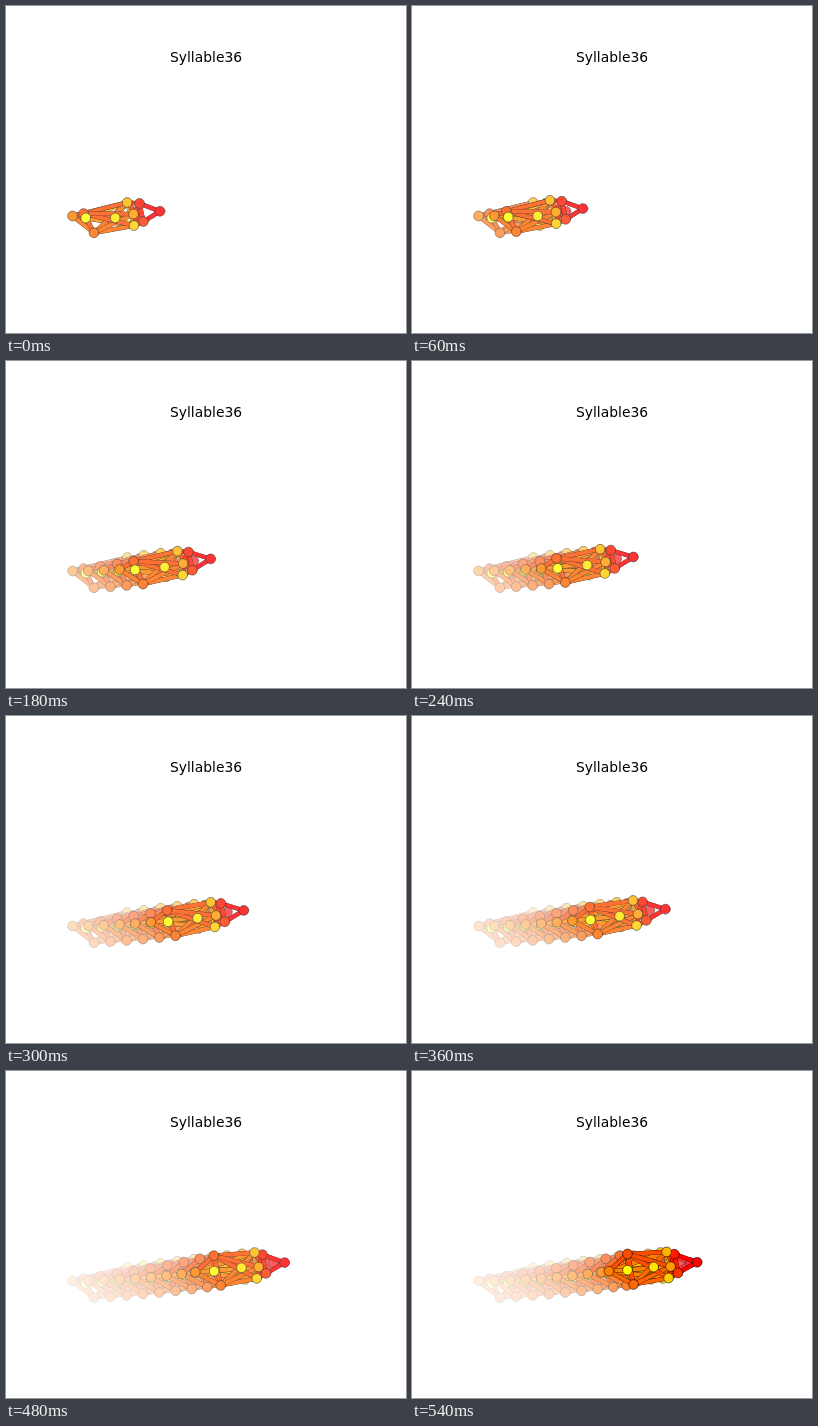
An HTML page with a canvas that plays this animation: 400x327 px, repeating every 600 ms.

```html
<!DOCTYPE html>
<html lang="en">
<head>
<meta charset="utf-8">
<title>Syllable36</title>
<style>
  html, body { margin: 0; width: 100%; height: 100%; overflow: hidden; background: #fff; }
  canvas { display: block; }
</style>
</head>
<body>
<canvas id="stage" width="400" height="327"></canvas>
<script>
const ctx = document.getElementById('stage').getContext('2d');
const STEPS = 10, STEP_MS = 60, FADE = 0.2;
const LINE = 4.5, NODE_RADIUS = 4.9;

// First and last position of each body part, from red to yellow.
const parts = [
  { name: 'nose',      from: [154, 205.3],   to: [285.2, 191.3] },
  { name: 'earL',      from: [133.5, 197.5], to: [262.4, 183.2] },
  { name: 'earR',      from: [137.4, 215.6], to: [266, 202] },
  { name: 'hipL',      from: [77.6, 207.6],  to: [215.5, 183] },
  { name: 'hipR',      from: [88, 226.8],    to: [221.6, 213.5] },
  { name: 'tail',      from: [66.6, 210],    to: [197, 200.2] },
  { name: 'neck',      from: [127.5, 208],   to: [258.6, 195.6] },
  { name: 'shoulderL', from: [121.2, 196.5], to: [254.6, 180.9] },
  { name: 'shoulderR', from: [128, 219.6],   to: [256.6, 207] },
  { name: 'spine',     from: [109.2, 211.9], to: [241.7, 196] },
  { name: 'hips',      from: [79.8, 212],    to: [215.5, 199.2] }
];
const colors = parts.map((_, i) => `rgb(255,${Math.round(i * 25.5)},0)`);

// The torso is fully connected; ears join its front, the nose only the ears.
const neighbours = {
  nose: /^ear/,
  ear: /^(ear|neck|shoulder)/,
  torso: /./
};
const edges = [];
for (let a = parts.length - 1; a >= 0; a--) {
  const kind = a === 0 ? 'nose' : a < 3 ? 'ear' : 'torso';
  for (let b = parts.length - 1; b > a; b--) {
    if (neighbours[kind].test(parts[b].name)) edges.push([a, b]);
  }
}

// The front runs ahead and brakes early; the rear lags, dips and stops late.
function position({ from, to }, step) {
  const u = step / (STEPS - 1);
  const forward = from[0] - 66;
  const speed = 1.08 + 0.0009 * forward;
  const progress = speed * u - (speed - 1) * u ** (12 - 0.07 * forward);
  const dip = (2.3 - 0.05 * forward) * 4 * progress * (1 - progress);
  const [x, y] = from.map((v, axis) => v + (to[axis] - v) * progress);
  return [x, y + dip];
}

function drawLine(a, b, color, width) {
  ctx.strokeStyle = color;
  ctx.lineWidth = width;
  ctx.beginPath();
  ctx.moveTo(...a);
  ctx.lineTo(...b);
  ctx.stroke();
}

function drawPose(step) {
  const pose = parts.map(part => position(part, step));
  ctx.lineCap = 'square';
  for (const [a, b] of edges) {
    drawLine(pose[a], pose[b], '#000', LINE);
    drawLine(pose[a], pose[b], colors[a], LINE * 0.9);
  }
  ctx.lineWidth = 0.55;
  ctx.strokeStyle = '#000';
  pose.forEach(([x, y], i) => {
    ctx.fillStyle = colors[i];
    ctx.beginPath();
    ctx.arc(x, y, NODE_RADIUS, 0, Math.PI * 2);
    ctx.fill();
    ctx.stroke();
  });
}

function cover(alpha) {
  ctx.fillStyle = `rgba(255,255,255,${alpha})`;
  ctx.fillRect(0, 0, 400, 327);
}

function draw(lastStep) {
  cover(1);
  for (let step = 0; step <= lastStep; step++) {
    drawPose(step);
    if (step < STEPS - 1) cover(FADE);
  }
  ctx.fillStyle = '#000';
  ctx.font = '13.89px "DejaVu Sans", sans-serif';
  ctx.fillText('Syllable36', 164, 56);
}

const start = performance.now();
let shown = -1;
function tick() {
  const step = Math.floor((performance.now() - start) / STEP_MS) % STEPS;
  if (step !== shown) draw(shown = step);
  requestAnimationFrame(tick);
}
tick();
</script>
</body>
</html>
```
